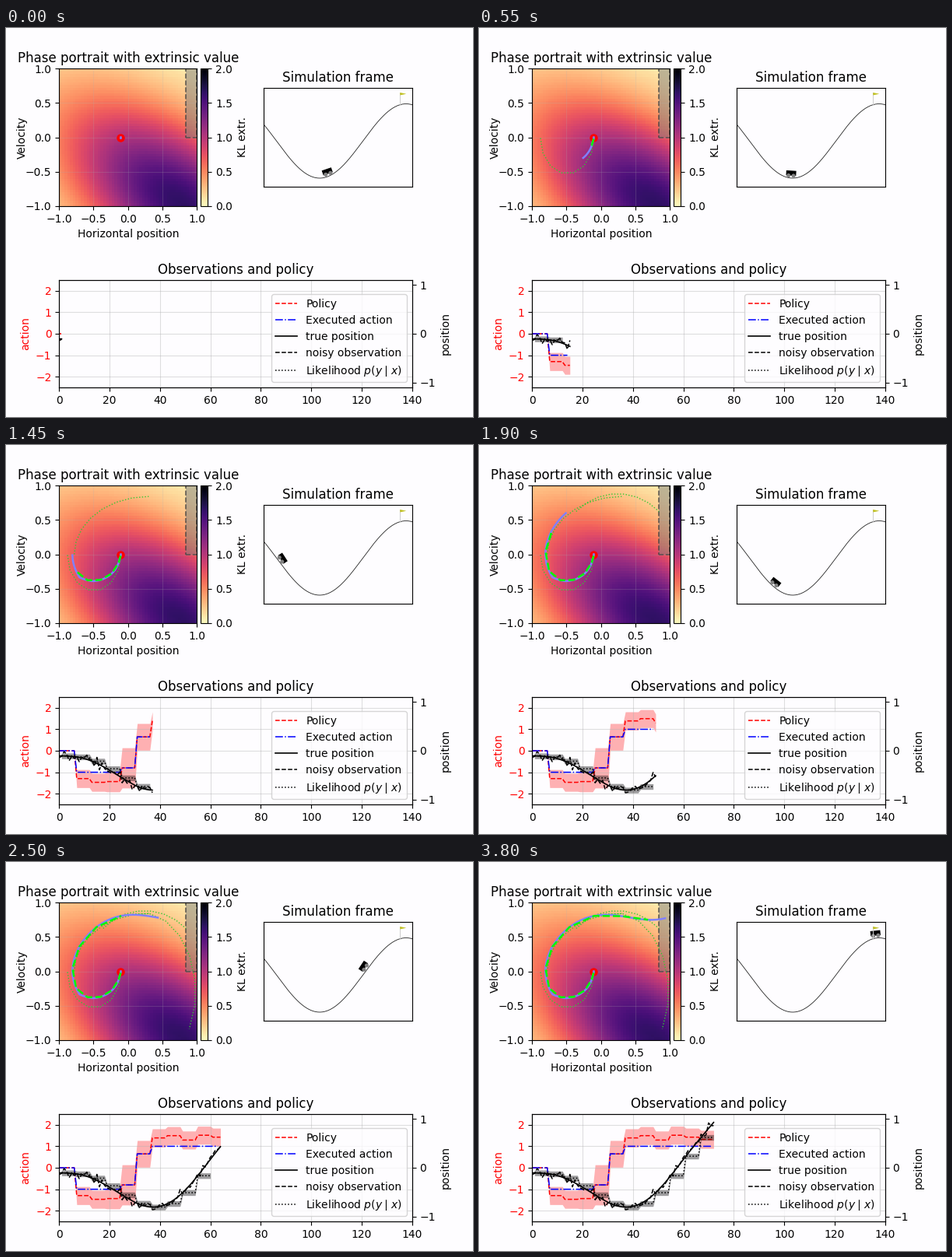
Animation of 600x500 px, one loop 3.85 s. Source, as a matplotlib script:

```python
import numpy as np
import matplotlib.pyplot as plt
from matplotlib.animation import FuncAnimation
from matplotlib.patches import Circle, Polygon, Rectangle
from matplotlib.transforms import Affine2D

W, H = 600, 500
FRAMES, INTERVAL = 77, 50
LAST, BLOCK = 72, 6
PAPER = "#fefdff"

plt.rcParams["font.family"] = "DejaVu Sans"
plt.rcParams["axes.facecolor"] = PAPER
fig = plt.figure(figsize=(W / 100, H / 100), dpi=100, facecolor=PAPER)


def add_axes(left, top, right, bottom):
    """Axes given by pixel edges, measured from the top left."""
    return fig.add_axes([left / W, 1 - bottom / H,
                         (right - left) / W, (bottom - top) / H])


# ---- hill geometry in pixels ---------------------------------------------
def hill_phase(x):
    return np.pi * (x - 403) / 111


def hill(x):
    return 145.25 + 47.75 * np.cos(hill_phase(x))


def road_x(position):
    return 424.5 + 92 * position


# ---- simulated run -------------------------------------------------------
steps = np.arange(LAST + 1)
block = (steps + BLOCK - 1) // BLOCK
active = block >= 2

# The policy pushes left, then swings over to the right.
policy = active * (1.42 * np.tanh(1.37 * (block - 5.565))
                   + 0.13 * np.cos(2.3 * (block - 7.6)))
spread = active * (0.42 + 0.55 * np.exp(-((block - 5.2) / 0.8) ** 2))
action = np.clip(policy, -1, 1)

PUSH, GRAVITY, SPEED = 0.021, 0.032, 0.082
pos, vel = np.zeros(LAST + 1), np.zeros(LAST + 1)
pos[0] = -0.105
for n in range(LAST):
    pull = GRAVITY * np.sin(hill_phase(road_x(pos[n])))
    vel[n + 1] = vel[n] + PUSH * action[n + 1] - pull
    pos[n + 1] = pos[n] + SPEED * (vel[n] + vel[n + 1]) / 2

obs = pos + np.random.default_rng(4).normal(0, 0.055, LAST + 1)
lik = pos[np.maximum(BLOCK * block - BLOCK + 1, 0)]
belief = np.column_stack([pos, vel])[2::BLOCK]


def arc(cx, cy, rx, ry, start, end):
    a = np.radians(np.linspace(start, end, 8))
    return cx + rx * np.cos(a), cy + ry * np.sin(a)


# Planned paths, keyed by the step at which each appears.
plans = {
    13: arc(-0.49, 0, 0.39, 0.53, 0, -180),
    31: arc(0.3, 0, 1.08, 0.84, 180, 90),
    43: arc(0.24, 0, 0.85, 0.88, 135, 45),
    55: arc(0.2, -0.3, 0.78, 1.15, 100, -28),
}

# ---- phase portrait ------------------------------------------------------
phase = add_axes(68.2, 52, 245.3, 229)
cells = np.linspace(-1, 1, 50)
gx, gy = np.meshgrid(cells - 0.8, cells + 1)
value = 1.65 * np.exp(-(0.52 * gx**2 + 0.72 * gx * gy + 0.7 * gy**2))
image = phase.imshow(value, origin="lower", extent=(-1, 1, -1, 1),
                     cmap="magma_r", vmin=0, vmax=2, aspect="auto",
                     interpolation="nearest")
phase.set(xlim=(-1, 1), ylim=(-1, 1), xlabel="Horizontal position")
phase.set_ylabel("Velocity", labelpad=-2)
phase.set_title("Phase portrait with extrinsic value")
phase.set_xticks(np.arange(-1, 1.1, 0.5))
phase.set_yticks(np.arange(-1, 1.1, 0.5))
phase.grid(alpha=0.2)
phase.add_patch(Rectangle((0.842, 0), 0.158, 1, fc=(.5, .5, .5, .5),
                          ec=(.25, .25, .25, .8), ls="--", lw=1.2))
phase.plot(-0.11, 0, "o", mfc="none", mec="red", mew=2.5, ms=5)

plan_lines = {start: phase.plot(*path, ":", color="#32c832", lw=1)[0]
              for start, path in plans.items()}
trace, = phase.plot([], [], color="#8080ff", lw=1.8)
belief_line, = phase.plot([], [], "--", color="lime", lw=1.8)

bar = fig.colorbar(image, cax=add_axes(250.3, 52, 259.3, 229))
bar.set_label("KL extr.")
bar.set_ticks(np.arange(0, 2.1, 0.5))

# ---- hill and car --------------------------------------------------------
sim = add_axes(330.7, 77, 521.7, 204.3)
sim.set(xlim=(330.7, 521.7), ylim=(204.3, 77), xticks=[], yticks=[])
sim.set_title("Simulation frame")

road = np.linspace(330, 523, 200)
sim.plot(road, hill(road), color="#222222", lw=0.6)
car = [Rectangle((-6.4, -9.6), 12.8, 6.4, fc="black", lw=0, zorder=3)]
car += [Circle((x, -3.2), 2.55, fc="#808080", lw=0, zorder=4)
        for x in (-3.2, 3.2)]
for part in car:
    sim.add_patch(part)
flag_x = 506.3
sim.plot([flag_x, flag_x], [hill(flag_x), 83], color="#cccccc", lw=0.7,
         zorder=5)
sim.add_patch(Polygon([(flag_x, 83), (flag_x, 86.4), (flag_x + 8, 84.7)],
                      fc="#c0c020", lw=0, zorder=6))

# ---- observations and policy ---------------------------------------------
left = add_axes(68.2, 324, 521.7, 462)
left.set(xlim=(0, 140), ylim=(-2.5, 2.5))
left.set_title("Observations and policy")
left.set_ylabel("action", color="red")
left.set_yticks(range(-2, 3))
left.tick_params(axis="y", labelcolor="red")
left.grid(alpha=0.4)
right = left.twinx()
right.set(ylim=(-1.1, 1.1), ylabel="position", yticks=[-1, 0, 1])


def add_band(ax, color, alpha):
    return ax.fill_between([0, 0], [0, 0], [0, 0], color=color, alpha=alpha,
                           lw=0)


def set_band(band, x, mid, half):
    band.set_verts([np.column_stack([
        np.concatenate([x, x[::-1]]),
        np.concatenate([mid + half, (mid - half)[::-1]])])])


policy_band = add_band(left, "red", 0.3)
lik_band = add_band(right, "black", 0.38)
policy_line, = left.plot([], [], "--", color="red", lw=1.1, label="Policy")
action_line, = left.plot([], [], "-.", color="blue", lw=1.1,
                         label="Executed action")
pos_line, = right.plot([], [], "-", color="black", lw=1.2,
                       label="true position")
obs_line, = right.plot([], [], "--", color="black", lw=1.1,
                       label="noisy observation")
lik_line, = right.plot([], [], ":", color="black", lw=1.1,
                       label=r"Likelihood $p(y\mid x)$")
right.legend(handles=[policy_line, action_line, pos_line, obs_line, lik_line],
             loc="lower right")


def update(frame):
    t = min(LAST, int(1.25 * frame + 1.5))
    seen = slice(0, t + 1)
    blocks = t // BLOCK

    trace.set_data(pos[seen], vel[seen])
    belief_line.set_data(*belief[:blocks].T)
    for start, line in plan_lines.items():
        line.set_visible(t >= start)

    policy_line.set_data(steps[seen], policy[seen])
    set_band(policy_band, steps[seen], policy[seen], spread[seen])
    action_line.set_data(steps[:t], action[:t])
    pos_line.set_data(steps[seen], pos[seen])
    obs_line.set_data(steps[seen], obs[seen])

    done = slice(1, blocks * BLOCK + 1)
    lik_line.set_data(steps[done], lik[done])
    lik_band.set_visible(blocks > 0)
    if blocks:
        set_band(lik_band, steps[done], lik[done], 0.058)

    x = road_x(pos[t])
    place = Affine2D().rotate(-np.sin(hill_phase(x))).translate(x, hill(x))
    for part in car:
        part.set_transform(place + sim.transData)
    return []


anim = FuncAnimation(fig, update, frames=FRAMES, interval=INTERVAL,
                     init_func=lambda: update(0), repeat=True, repeat_delay=0)
plt.show()
```
